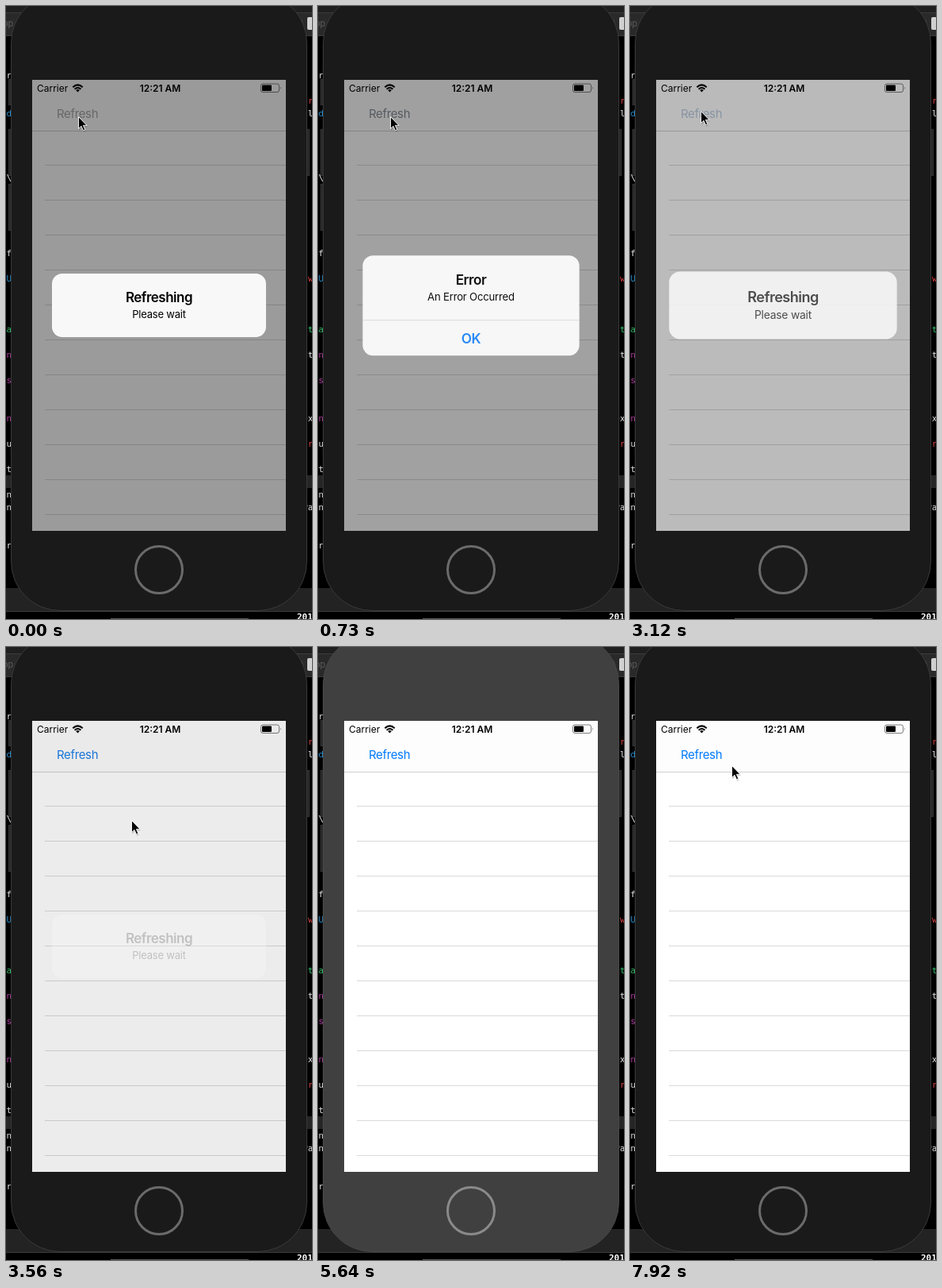
These frames come from a looping animation (386x772 px, 8000 ms). An HTML page:

```html
<!DOCTYPE html>
<html lang="en">
<head>
<meta charset="utf-8">
<title>Refresh alert</title>
<style>
html, body { margin: 0; width: 100%; height: 100%; overflow: hidden; background: #000; }
svg { display: block; width: 100%; height: 100%; }
text { font-family: Inter, "Liberation Sans", sans-serif; }
.code text { font: 11px "DejaVu Sans Mono", monospace; }
.title { font-size: 17px; font-weight: 600; letter-spacing: -.5px; }
.msg { font-size: 13px; letter-spacing: -.2px; }
.alert text { text-anchor: middle; }
</style>
</head>
<body>
<svg viewBox="0 0 386 772">
  <rect width="386" height="772"/>
  <rect width="386" height="8" fill="#1f1f1f"/>
  <rect y="8" width="386" height="29" fill="#292929"/>
  <path d="M0 8.5H386M0 37.5H386" stroke="#3b3b3b"/>
  <text x="-4" y="26" font-size="11" fill="#5c5c5c">op</text>
  <circle cx="368" cy="22" r="6" fill="none" stroke="#555" stroke-width="1.5"/>
  <rect x="380" y="14" width="10" height="16" rx="2" fill="#d0d0d0"/>
  <g fill="#272727" stroke="#343434">
    <rect x="3.5" y="92.5" width="20" height="32"/>
    <rect x="3.5" y="155.5" width="379" height="58"/>
    <rect x="3.5" y="224.5" width="20" height="58"/>
  </g>
  <rect y="591" width="386" height="16" fill="#262626"/>
  <rect y="733" width="386" height="29" fill="#232323"/>
  <path d="M0 762.5H386" stroke="#3b3b3b"/>
  <path d="M132 771.5H306" stroke="#555"/>
  <g class="code" id="code"></g>
  <text x="367" y="773" style="font:bold 11px 'DejaVu Sans Mono',monospace" fill="#fff">201</text>

  <rect id="body" x="6.5" y="-15.5" width="373" height="777" rx="62"/>
  <circle id="home" cx="193" cy="710" r="29.5" fill="none" stroke-width="3"/>

  <svg x="33" y="93" width="320" height="568" viewBox="33 93 320 568">
    <rect x="33" y="93" width="320" height="568" fill="#fff"/>
    <rect x="33" y="93" width="320" height="64" fill="#fdfdfd"/>
    <rect x="33" y="157" width="320" height="1" fill="#cfcfcf"/>
    <g id="rows" fill="#dadada"></g>
    <text id="refresh" x="64" y="140.5" font-size="15" letter-spacing="-.35">Refresh</text>
    <rect id="dim" x="33" y="93" width="320" height="568"/>
    <text x="39" y="107.5" font-size="12">Carrier</text>
    <text x="194.5" y="107.5" font-size="12" font-weight="600" text-anchor="middle">12:21 AM</text>
    <g fill="none" stroke="#000" stroke-width="2">
      <path d="M84.3 102.2Q90.5 96.6 96.7 102.2M86.6 104.7Q90.5 101.3 94.4 104.7"/>
      <path d="M88.2 106Q90.5 104.2 92.8 106L90.5 108.4Z" fill="#000" stroke="none"/>
    </g>
    <rect x="321.5" y="98" width="23" height="10.5" rx="2.5" fill="none" stroke="#000" stroke-opacity=".5"/>
    <rect x="323" y="99.5" width="12" height="7.5" rx="1"/>
    <path d="M346 101.5Q347.8 103.2 346 105Z" fill-opacity=".5"/>

    <g class="alert" id="wait">
      <rect x="58" y="337" width="270" height="80" rx="13" fill="#f8f8f8"/>
      <g>
        <text class="title" x="193" y="373">Refreshing</text>
        <text class="msg" x="193" y="393">Please wait</text>
      </g>
    </g>
    <g class="alert" id="error">
      <rect x="58" y="315" width="270" height="124.5" rx="13" fill="#f8f8f8"/>
      <g>
        <text class="title" x="193" y="351">Error</text>
        <text class="msg" x="193" y="371">An Error Occurred</text>
        <rect x="58" y="395" width="270" height="1" fill="#dadada"/>
        <text class="title" x="193" y="424" fill="#1a82f7">OK</text>
      </g>
    </g>
  </svg>

  <g id="cursor">
    <path d="M1 2V17.5L4.6 14.2L7 19.8L9.6 18.7L7.2 13.2H12Z" opacity=".2"/>
    <path d="M.5 .5V15.5L4 12.3L6.4 17.8L8.8 16.8L6.4 11.4H11Z" stroke="#fff" stroke-width=".9"/>
  </g>
</svg>
<script>
const $ = id => document.getElementById(id);
const LOOP = 8000, STEP = 148.4, LEAD = 16;
const clamp = x => Math.min(1, Math.max(0, x));
const smooth = x => { x = clamp(x); return x * x * (3 - 2 * x); };
const mix = (a, b, k) => a + (b - a) * k;

// Editor text peeking out on both sides: y, left, right, colours
const white = '#e4e4e4', blue = '#2a8fd0', green = '#35c46a', pink = '#b03aa0', red = '#e0403c';
const lines = [
  [91, 'r'], [123, '', 'or', red, red], [139, 'd', 'll', blue], [220, '\\'], [315, 'f'],
  [347, 'U', 'w', blue, red], [411, 'a', 'nt', green, green], [443, 'n', 'ct', pink],
  [475, 's', '', pink], [523, 'n', 'ex', pink], [555, 'u', 'ar', white, red],
  [587, 't'], [619, 'n'], [635, 'n', 'Pa'], [683, 'r']
];
$('code').innerHTML = lines.map(([y, l, r = '', lc = white, rc = white]) =>
  `<text x="0.5" y="${y}" fill="${lc}">${l}</text>` +
  `<text x="387.5" y="${y}" fill="${rc}" text-anchor="end">${r}</text>`).join('');

for (let y = 200; y < 661; y += 44)
  $('rows').innerHTML += `<rect x="49" y="${y}" width="304" height="1"/>`;

// Each alert: [shown at, dismissed at]
const waits = [[-1000, 82], [2955, 3310]];
const errors = [[432, 2090], [3660, 4464]];
const taps = [-270, 3116];
// Pointer stops: time, x, y
const path = [
  [0, 91, 139], [1336, 91, 139], [1929, 174, 412], [2300, 174, 412], [2819, 89, 132],
  [3265, 89, 132], [3561, 158, 218], [4007, 208, 408], [6677, 208, 408],
  [6678, 371, 403], [6827, 371, 403], [7865, 128, 149], [8000, 128, 149]
];

function spring(ms) {
  const w = Math.max(0, ms) * .0145;
  return 1 - (1 + w) * Math.exp(-w);
}

function drawAlert(el, spans, t) {
  const [start, end] = spans.findLast(s => t >= s[0]) || [1e9, 1e9];
  const grow = spring(t - start);
  const p = grow * (1 - smooth((t - end) / 350));
  const s = 1.2 - .2 * grow;
  el.setAttribute('transform', `translate(193 377) scale(${s}) translate(-193 -377)`);
  el.children[0].setAttribute('opacity', 1 - (1 - p) ** 1.8);
  el.children[1].setAttribute('opacity', p);
  return p;
}

function drawCursor(t, hidden) {
  const i = Math.max(1, path.findIndex(p => p[0] > t));
  const [t0, x0, y0] = path[i - 1], [t1, x1, y1] = path[i];
  const k = smooth((t - t0) / (t1 - t0));
  $('cursor').setAttribute('transform', `translate(${mix(x0, x1, k)} ${mix(y0, y1, k)})`);
  $('cursor').setAttribute('visibility', hidden ? 'hidden' : 'visible');
}

function draw(ms) {
  const n = Math.floor((ms + LEAD) / STEP), t = n * STEP;
  const inactive = n >= 38 && n < 45;

  $('body').setAttribute('fill', inactive ? '#404040' : '#1a1a1a');
  $('body').setAttribute('stroke', inactive ? '#484848' : '#3a3a3a');
  $('home').setAttribute('stroke', inactive ? '#8a8a8a' : '#6b6b6b');

  const p = Math.max(drawAlert($('wait'), waits, t), drawAlert($('error'), errors, t));
  $('dim').setAttribute('opacity', .392 * p);

  const tap = taps.findLast(s => t >= s);
  $('refresh').setAttribute('fill', `rgb(${[0, 122, 255].map(c => Math.round(mix(c, 144, p)))})`);
  $('refresh').setAttribute('opacity', mix(.45, 1, clamp((t - tap) / 450)));

  drawCursor(t, inactive);
}

const begin = performance.now();
function tick() {
  draw((performance.now() - begin) % LOOP);
  requestAnimationFrame(tick);
}
tick();
</script>
</body>
</html>
```
